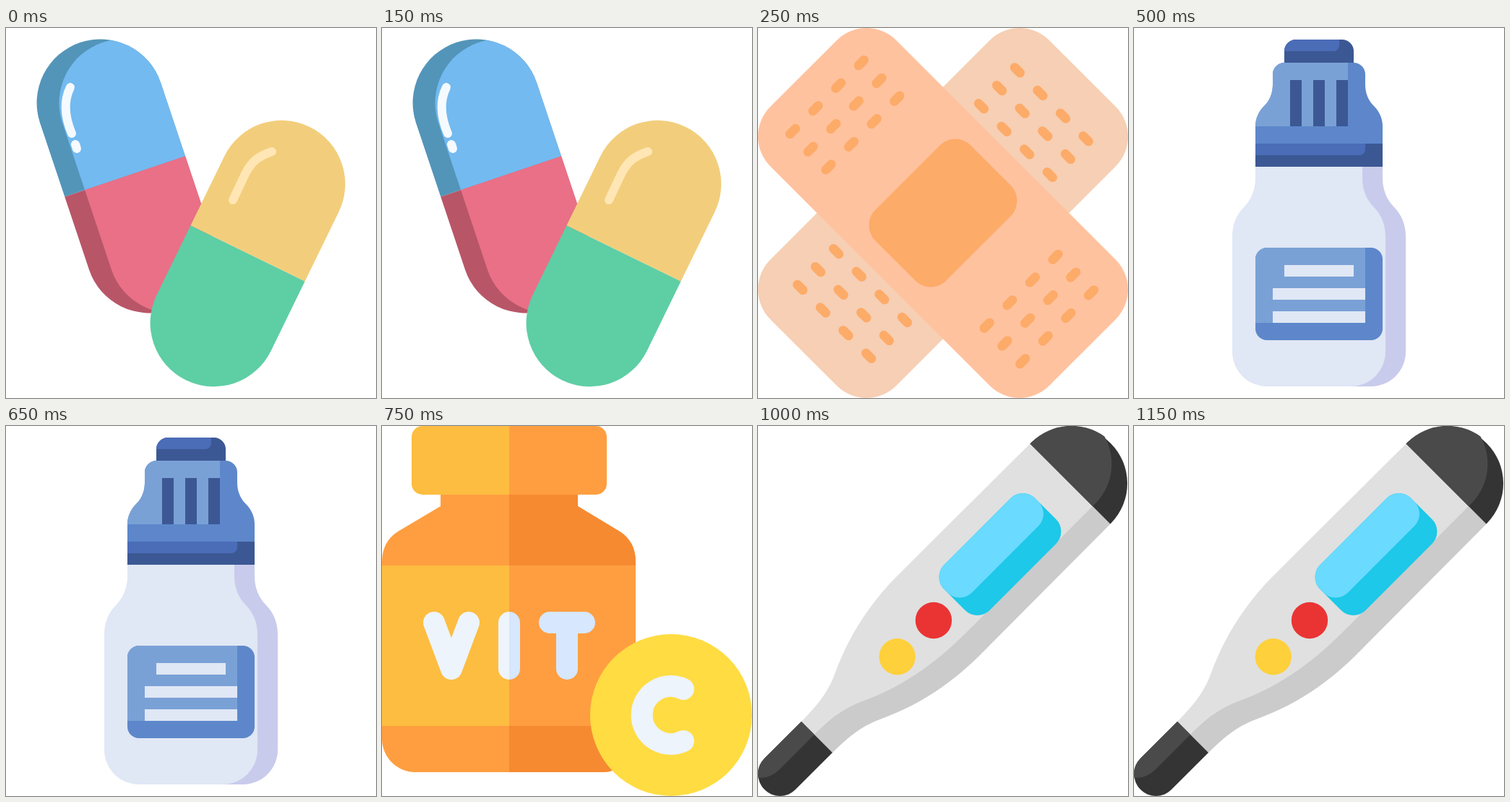
These frames come from a looping animation (512 by 512 pixels, 1.25 s). An HTML page:

```html
<!DOCTYPE html>
<html lang="en">
<head>
<meta charset="utf-8">
<title>Medicine icons</title>
<style>
  html, body { margin: 0; width: 100%; height: 100%; overflow: hidden; background: #fff; }
  svg { display: block; width: 100%; height: 100%; }
  .scene {
    opacity: 0;
    animation: show 1250ms step-end infinite;
    animation-delay: calc(var(--i) * 250ms - 1250ms);
  }
  @keyframes show {
    0% { opacity: 1; }
    20%, 100% { opacity: 0; }
  }
  .line { fill: none; stroke-linecap: round; stroke-linejoin: round; }
  .holes { stroke: #fdab69; stroke-width: 12.8; stroke-dasharray: 10.6 34.1; }
</style>
</head>
<body>
<svg viewBox="0 0 512 512">
  <defs>
    <rect id="pill" x="-88" y="-195" width="176" height="390" rx="88"/>
    <rect id="strip" x="-273" y="-123.3" width="546" height="246.6" rx="58.5"/>
    <path id="column" d="M0 -72.3V72.6"/>
    <path id="collar" d="M192 64A16 16 0 0 1 208 48H304A16 16 0 0 1 320 64V78C320 90 324 100 332 108C340 116 344 126 344 136V160H168V136C168 126 172 116 180 108C188 100 192 90 192 78Z"/>
    <path id="jar" d="M81 95H271V111L329 146Q351 160 351 188V433A46 46 0 0 1 305 479H46A46 46 0 0 1 0 433V188Q0 160 22 146L81 111Z"/>
    <rect id="lid" x="41" y="0" width="270" height="95" rx="15"/>
    <clipPath id="pillClip"><use href="#pill" transform="translate(164.5 205) rotate(-18.5)"/></clipPath>
    <clipPath id="shiftClip"><use href="#pill" transform="translate(195.5 205) rotate(-18.5)"/></clipPath>
    <clipPath id="goldClip"><use href="#pill"/></clipPath>
    <clipPath id="collarClip"><use href="#collar"/></clipPath>
    <clipPath id="jarClip"><use href="#jar"/></clipPath>
    <clipPath id="lidClip"><use href="#lid"/></clipPath>
  </defs>

  <!-- capsules -->
  <g class="scene" style="--i:0">
    <g clip-path="url(#pillClip)">
      <path fill="#5395b9" d="M0 0H308V157L0 261Z"/>
      <path fill="#b85668" d="M0 261L308 157V420H0Z"/>
      <g clip-path="url(#shiftClip)">
        <path fill="#73baf0" d="M0 0H308V157L0 261Z"/>
        <path fill="#e97087" d="M0 261L308 157V420H0Z"/>
      </g>
    </g>
    <path class="line" stroke="#f5faff" stroke-width="12" d="M89 82C80 100 80 120 91 146M96 161L98 167"/>
    <g transform="translate(334.5 312) rotate(26)">
      <g clip-path="url(#goldClip)">
        <path fill="#f2ce7c" d="M-90 -200H90V0H-90Z"/>
        <path fill="#5ecea5" d="M-90 0H90V200H-90Z"/>
      </g>
    </g>
    <path class="line" stroke="#ffe6b4" stroke-width="12" d="M368 171C350 177 340 184 331 202L314 238"/>
  </g>

  <!-- plasters -->
  <g class="scene" style="--i:1">
    <g transform="translate(256 256) rotate(-45)">
      <use href="#strip" fill="#f6cfb4"/>
      <g class="line holes">
        <use href="#column" x="-212.5"/><use href="#column" x="-177.5"/><use href="#column" x="-142"/>
        <use href="#column" x="142"/><use href="#column" x="177.5"/><use href="#column" x="212.5"/>
      </g>
    </g>
    <g transform="translate(256 256) rotate(45)">
      <use href="#strip" fill="#ffc29f"/>
      <rect fill="#fdab69" x="-69.3" y="-93.3" width="138.6" height="186.6" rx="30"/>
      <g class="line holes">
        <use href="#column" x="-227"/><use href="#column" x="-192"/><use href="#column" x="-157"/>
        <use href="#column" x="153"/><use href="#column" x="188"/><use href="#column" x="223"/>
      </g>
    </g>
  </g>

  <!-- dropper bottle -->
  <g class="scene" style="--i:2">
    <path fill="#3c5894" d="M208 48V32A16 16 0 0 1 224 16H288A16 16 0 0 1 304 32V48Z"/>
    <path fill="#4b6cb7" d="M208 32A16 16 0 0 1 224 16H284V24A8 8 0 0 1 276 32Z"/>
    <use href="#collar" fill="#5d87ca"/>
    <path clip-path="url(#collarClip)" fill="#7aa1d6" d="M160 40H296V136H160Z"/>
    <path fill="#3c5894" d="M216 72h16v64h-16zM248 72h16v64h-16zM280 72h16v64h-16zM168 160H344V192H168Z"/>
    <path fill="#4b6cb7" d="M168 160H320V168A8 8 0 0 1 312 176H168Z"/>
    <path fill="#c9cbec" d="M300 192H344V208C344 224 350 238 360 248C370 258 376 272 376 288V448A48 48 0 0 1 328 496H290Z"/>
    <path fill="#e0e7f5" d="M168 192V208C168 224 162 238 152 248C142 258 136 272 136 288V448A48 48 0 0 0 184 496H300A48 48 0 0 0 348 448V288C348 272 342 258 332 248C322 238 316 224 316 208V192Z"/>
    <rect fill="#5d87ca" x="168" y="304" width="176" height="128" rx="16"/>
    <path fill="#7aa1d6" d="M168 408V320A16 16 0 0 1 184 304H320V408Z"/>
    <path fill="#e0e7f5" d="M208 328h96v16h-96zM192 360h128v16h-128zM192 392h128v16h-128z"/>
  </g>

  <!-- vitamin jar -->
  <g class="scene" style="--i:3" role="img" aria-label="VIT C">
    <g clip-path="url(#lidClip)">
      <path fill="#fdbd40" d="M0 0H176V95H0Z"/>
      <path fill="#ff9e40" d="M176 0H351V95H176Z"/>
    </g>
    <g clip-path="url(#jarClip)">
      <path fill="#ff9e40" d="M0 95H351V479H0Z"/>
      <path fill="#f68a31" d="M176 95H351V193H176ZM176 415H351V479H176Z"/>
      <path fill="#fdbd40" d="M0 193H176V415H0Z"/>
    </g>
    <g class="line" stroke-width="30">
      <path stroke="#edf4fc" d="M72 272L96 336L120 272"/>
      <path stroke="#d6e7fe" d="M232 272H280M256 272V336"/>
    </g>
    <path fill="#edf4fc" d="M176 257A15 15 0 0 0 161 272V336A15 15 0 0 0 176 351Z"/>
    <path fill="#d6e7fe" d="M176 257A15 15 0 0 1 191 272V336A15 15 0 0 1 176 351Z"/>
    <circle fill="#ffdc42" cx="400" cy="400" r="112"/>
    <path class="line" stroke="#edf4fc" stroke-width="30" d="M417 364A40 40 0 1 0 417 436"/>
  </g>

  <!-- thermometer -->
  <g class="scene" style="--i:4">
    <path fill="#e0e0e0" d="M377 24L196 204C150 250 124 295 107 341C98 366 85 384 60 409L103 452C128 427 146 414 171 405C217 388 262 362 308 316L488 135Z"/>
    <path fill="#cbcbcb" d="M463 111L287 287C240 334 193 363 147 380C120 390 103 402 78 427L103 452C128 427 146 414 171 405C217 388 262 362 308 316L488 135Z"/>
    <path fill="#343434" d="M376.5 24.5L378 23A78.5 78.5 0 0 1 489 134L487.5 135.5Z"/>
    <path fill="#4a4a4a" d="M376.5 24.5L378 23A78.5 78.5 0 0 1 479.5 14.5A78 78 0 0 1 463 111Z"/>
    <path fill="#343434" d="M60 409L8.9 460.1A30.4 30.4 0 0 0 51.9 503.1L103 452Z"/>
    <path fill="#4a4a4a" d="M60 409L8.9 460.1A30.4 30.4 0 0 0 .5 487Q17 488 30 475L78 427Z"/>
    <g transform="translate(335 177.5) rotate(-45)">
      <rect fill="#1dc8e8" x="-89" y="-44.5" width="178" height="89" rx="24"/>
      <rect fill="#6adaff" x="-89" y="-44.5" width="178" height="54.4" rx="24"/>
    </g>
    <circle fill="#ea3434" cx="243" cy="269" r="25.2"/>
    <circle fill="#fed03b" cx="192.7" cy="319.3" r="25.2"/>
  </g>
</svg>
</body>
</html>
```
